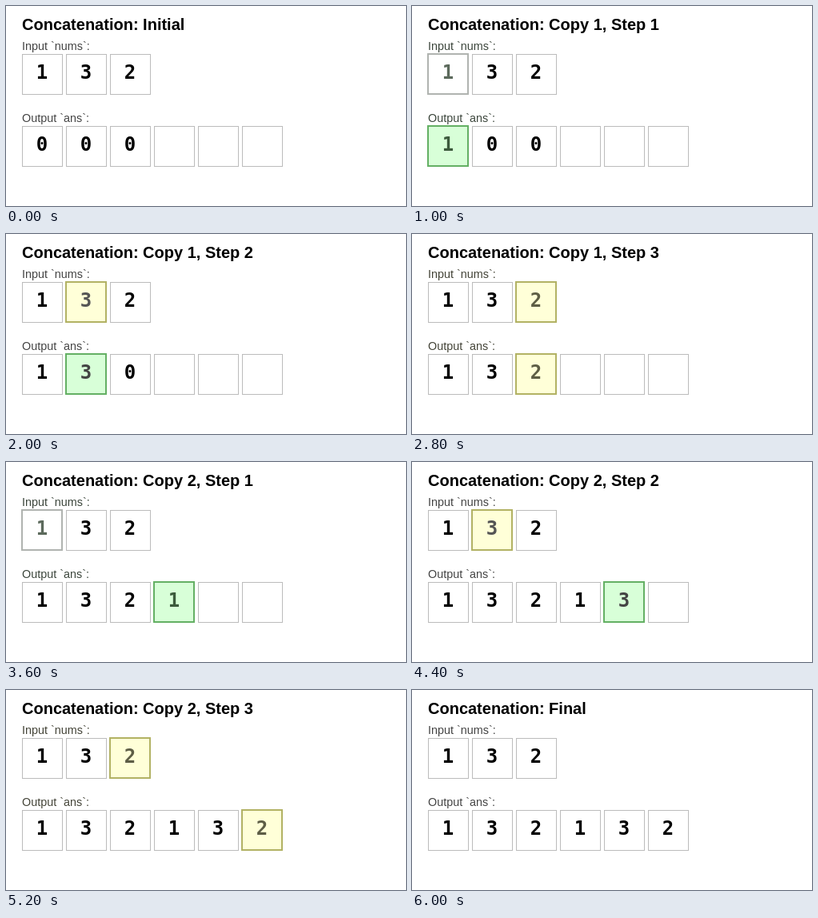
Recreate the animation shown at these times as an HTML page. Size 500 by 250 pixels, loop 6.8 s.

```html
<!DOCTYPE html>
<html lang="en">
<head>
<meta charset="utf-8">
<title>Array concatenation</title>
<style>
  html, body { margin: 0; width: 100%; height: 100%; overflow: hidden; background: #fff; }
  svg { display: block; }
  text { font-family: "Liberation Sans", Arial, sans-serif; }
  .title { font-size: 20px; font-weight: bold; }
  .label { font-size: 14.4px; }
  .digit { font: bold 24px "DejaVu Sans Mono", monospace; text-anchor: middle; }
</style>
</head>
<body>
<svg id="stage" width="500" height="250" viewBox="0 0 500 250"></svg>
<script>
const stage = document.getElementById('stage');
const nums = [1, 3, 2];
const starts = [0, 1000, 2000, 2800, 3600, 4400, 5200, 6000];
const LOOP = 6800;

const plain = { fill: '#fff', stroke: '#bbb', ink: '#000' };
const yellow = { fill: '#ffffd8', stroke: '#b2b264', ink: '#555' };
const green = { fill: '#d8ffd8', stroke: '#64b064', ink: '#444' };

// Highlight colours for each position within a copy pass.
const looks = [
  { input: { fill: '#fff', stroke: '#b0b4b0', ink: '#5c6a5c' }, output: { ...green, ink: '#3c5a3c' }, label: '#3c463c' },
  { input: yellow, output: green, label: '#444' },
  { input: { ...yellow, ink: '#5e5e46' }, output: { ...yellow, ink: '#5e5e46' }, label: '#444438' },
];

function cell(index, y, value, style, active) {
  const x = 20 + index * 55;
  const inset = active ? 0 : 0.5;
  return `<rect x="${x + inset}" y="${y + inset}" width="50" height="50"
      fill="${style.fill}" stroke="${style.stroke}" stroke-width="${active ? 2 : 1}"/>
    <text class="digit" x="${x + 25}" y="${y + 31}" fill="${style.ink}">${value}</text>`;
}

function row(label, color, y, values, activeIndex, activeStyle) {
  const cells = values.map((value, i) => {
    const active = i === activeIndex;
    return cell(i, y, value, active ? activeStyle : plain, active);
  });
  return `<text class="label" x="20" y="${y - 5}" fill="${color}">${label}</text>` + cells.join('');
}

function render(step) {
  const copying = step > 0 && step < 7;
  const outIndex = copying ? step - 1 : -1;
  const inIndex = copying ? outIndex % 3 : -1;
  const look = looks[inIndex] || { label: '#444' };
  const ans = [0, 0, 0, '', '', ''].map((empty, i) => i < step ? nums[i % 3] : empty);
  const title = step === 0 ? 'Initial'
    : step === 7 ? 'Final'
    : `Copy ${Math.floor(outIndex / 3) + 1}, Step ${inIndex + 1}`;

  stage.innerHTML = `<text class="title" x="20" y="30">Concatenation: ${title}</text>`
    + row('Input `nums`:', look.label, 60, nums, inIndex, look.input)
    + row('Output `ans`:', look.label, 150, ans, outIndex, look.output);
}

let shown = -1;
const origin = performance.now();

function tick() {
  const time = (performance.now() - origin) % LOOP;
  const step = starts.filter(start => start <= time).length - 1;
  if (step !== shown) render(shown = step);
  requestAnimationFrame(tick);
}
tick();
</script>
</body>
</html>
```
